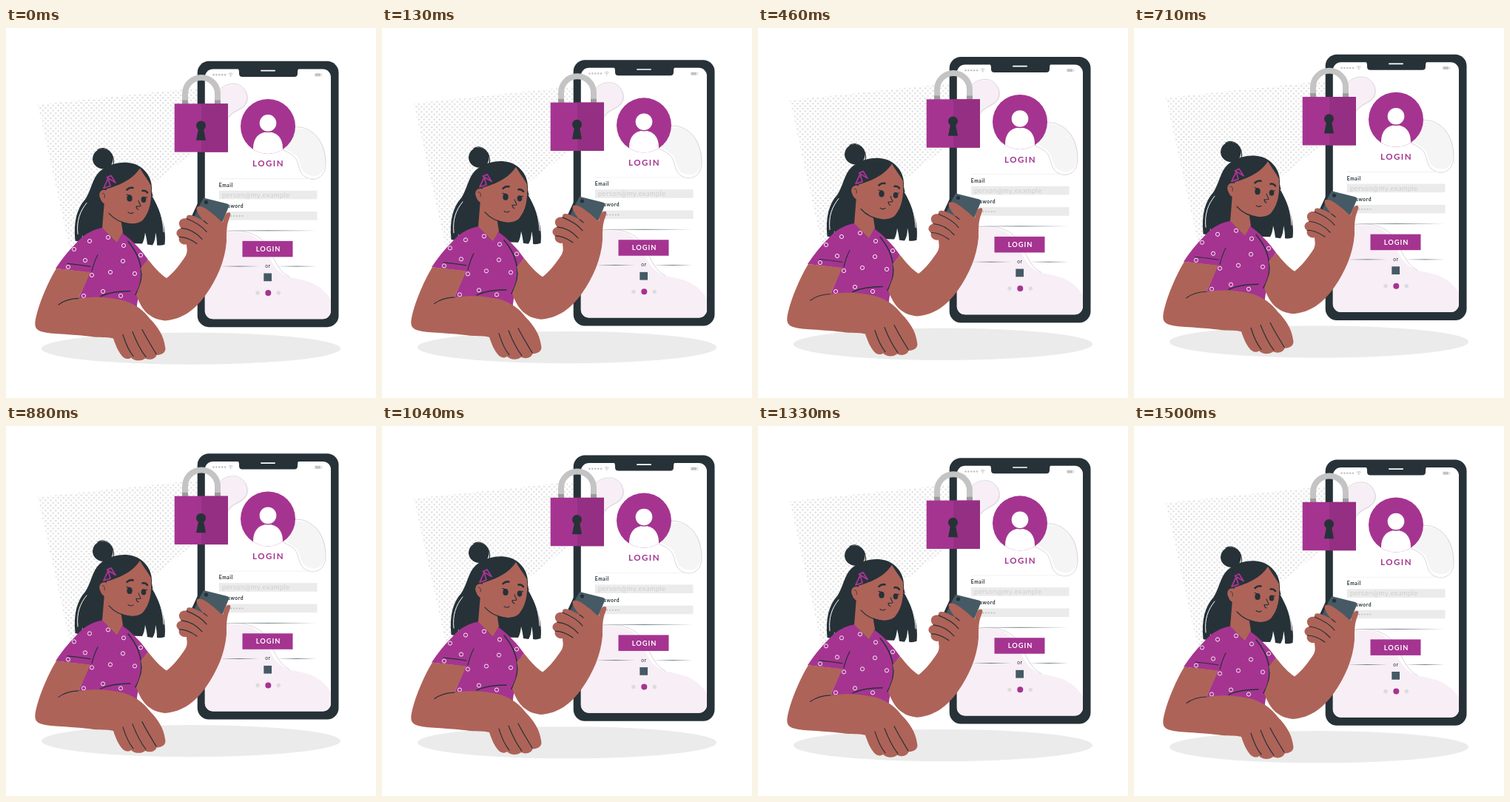
An HTML page for the animation above (1.54 s loop, 500 by 500 pixels).

```html
<!DOCTYPE html>
<html lang="en">
<head>
<meta charset="utf-8">
<title>Login illustration</title>
<style>
  html, body { margin: 0; width: 100%; height: 100%; overflow: hidden; background: #fff; }
  svg { display: block; width: 100vw; height: 100vh; }
  text { font-family: Lato, "Open Sans", sans-serif; }
  .dark { fill: #263238; }
  .main { fill: #a53491; }
  .skin { fill: #ae6358; }
  .pale { fill: #f7eef6; }
  .field { fill: #ebebeb; }
  .hint { fill: #b9b9b9; }
  .line { fill: none; stroke: #263238; stroke-width: 1.2; stroke-linecap: round; stroke-linejoin: round; }
  .edge { fill: none; stroke: #cfcbd0; stroke-width: .8; }
  .gap { fill: none; stroke: #fff; stroke-width: 1; stroke-linecap: round; }
  .label { font-size: 6.7px; font-weight: 700; letter-spacing: .58px; fill: #263238; }
</style>
</head>
<body>
<svg viewBox="0 0 500 500">
  <defs>
    <pattern id="dots" width="6.9" height="6.9" patternUnits="userSpaceOnUse">
      <circle cx="1.725" cy="1.725" r="1.35" fill="#dfdfdf"/>
      <circle cx="5.175" cy="5.175" r="1.35" fill="#dfdfdf"/>
    </pattern>
    <linearGradient id="fade">
      <stop offset="0" stop-color="#455a64" stop-opacity="0"/>
      <stop offset=".5" stop-color="#455a64"/>
      <stop offset="1" stop-color="#455a64" stop-opacity="0"/>
    </linearGradient>
    <clipPath id="screen"><rect x="268.8" y="56" width="170.2" height="337.7" rx="11"/></clipPath>
    <clipPath id="disc"><circle cx="354" cy="133.5" r="37"/></clipPath>
  </defs>

  <g id="scene">
    <path fill="url(#dots)" d="M43 104 L262 81 L264 160 L86 298 Z"/>
    <ellipse class="field" cx="250" cy="433.7" rx="202" ry="21.6"/>

    <g id="phone">
      <rect class="dark" x="258.7" y="45.4" width="190.8" height="359.3" rx="15.500"/>
      <g clip-path="url(#screen)">
        <rect x="268" y="55" width="172" height="340" fill="#fff"/>
        <path class="pale" d="M284 90 C291 81 298 77 307 77 C320 77 328 88 327 98 C325 113 308 111 302 122 C295 133 290 150 280 150 Z"/>
        <path class="edge" d="M284 89 C291 80 298 76 306 76 C320 75 327 88 326 97 C324 111 307 111 301 121"/>
        <path fill="#f5f5f5" d="M380 141 C400 129 430 141 432 178 C432 194 424 203 412 200 C394 196 401 181 391 172 C380 165 370 160 370 146 Z"/>
        <path class="edge" d="M388 135 C406 131 431 146 432 182 C433 199 421 208 409 204 C392 198 399 182 388 173 C383 169 378 167 374 165"/>
        <path class="pale" d="M268 282 C284 280 292 276 309 276 C330 276 342 284 349 297 C360 318 364 332 386 338 C408 342 426 346 440 369 L440 396 L268 396 Z"/>
        <path class="edge" d="M289 278 C310 271 334 275 347 288 C361 303 364 328 383 337"/>
      </g>
      <path class="dark" d="M312 54 H397 Q394 56 394 60 V62 Q394 66.500 389.500 66.500 H319.500 Q315 66.500 315 62 V60 Q315 56 312 54 Z"/>
      <rect x="344" y="57.300" width="20" height="1.700" rx=".8" fill="#fff"/>
      <g id="status" fill="#c3c3c3">
        <path fill="none" stroke="#c3c3c3" stroke-width="1" d="M300.800 62.500 Q303.700 60.200 306.600 62.500 M302 64 Q303.700 62.700 305.400 64"/>
        <circle cx="303.700" cy="65.400" r=".8"/>
        <rect x="417.500" y="61.800" width="7.500" height="4" rx=".6"/>
        <rect x="425.600" y="61.800" width="1.700" height="4" fill="#e0e0e0"/>
      </g>

      <circle class="main" cx="354" cy="133.500" r="37"/>
      <path clip-path="url(#disc)" fill="#fff" d="M334 172 V163 C334 149 342 141 354 141 S374 149 374 163 V172 Z"/>
      <circle cx="354" cy="129" r="12" fill="#fff" stroke="#a53491" stroke-width="1.300"/>
      <text class="main" x="333" y="188" font-size="11.500" font-weight="700" letter-spacing="1.500">LOGIN</text>
      <rect x="288" y="203.800" width="132" height=".8" fill="#eee"/>

      <text class="label" x="287.800" y="215.300">Email</text>
      <rect class="field" x="287.800" y="220.300" width="132.700" height="11.600"/>
      <text class="hint" x="292" y="229.300" font-size="9.500" font-weight="300" letter-spacing=".45">person@my.example</text>
      <text class="label" x="287.800" y="243.600">Password</text>
      <rect class="field" x="287.800" y="248.600" width="132.700" height="11.600"/>
      <rect x="288" y="274" width="132" height=".8" fill="url(#fade)"/>

      <rect class="main" x="319.500" y="288.400" width="68" height="21.500"/>
      <text x="337.800" y="302.600" font-size="9.300" font-weight="700" letter-spacing=".95" fill="#fff">LOGIN</text>
      <rect x="288" y="322.200" width="54" height=".8" fill="url(#fade)"/>
      <rect x="366" y="322.200" width="54" height=".8" fill="url(#fade)"/>
      <text x="353.800" y="324.600" font-size="6.800" letter-spacing=".4" text-anchor="middle" fill="#263238">or</text>
      <rect x="348.300" y="332" width="10.700" height="10.700" fill="#455a64"/>
      <circle cx="340" cy="358.500" r="2.700" fill="#dcdcdc"/>
      <circle class="main" cx="354.300" cy="358.500" r="4"/>
      <circle cx="368.300" cy="358.500" r="2.700" fill="#dcdcdc"/>
    </g>

    <g id="lock">
      <path fill="none" stroke="#c4c4c4" stroke-width="8" d="M242 104 V89.500 a22 22 0 0 1 44 0 V104"/>
      <path fill="none" stroke="#9c9c9c" stroke-width="8" d="M242 98 V104 M286 98 V104"/>
      <rect class="main" x="227.700" y="102.800" width="72.300" height="65.400"/>
      <rect x="264" y="102.800" width="36" height="65.400" fill="#952f83"/>
      <circle class="dark" cx="263.500" cy="132.500" r="6.500"/>
      <path class="dark" d="M260.500 134 H266.500 L270 152.300 H257 Z"/>
    </g>

    <g id="head">
      <path class="dark" d="M131 191 C122 190 117 184 117 177 C118 168 124 163.500 131.500 163.500 C140 165 145 171 144.500 178 C144 186 139 191 131 191 Z"/>
      <path class="line" d="M124 165 C135 158 148 171 145 186"/>
      <path class="dark" d="M93.500 288 C91 262 96 244 107 232 C115 221 116 204 127 194 C139 183.500 158 179.500 173 184 C188 189 197 203 197 216 C196 229 205 239 209 252 C214 268 216 280 214.500 293 Q209 295 204 294 Q204 284 202 277 Q202 288 198 294 L191 293 Q190 284 188 277 Q187 287 184 292 L150 291 L106 291 Q104 285 103 280 Q103 286 102 290 Z"/>
      <path class="gap" d="M97 279 C95 261 100 248 109 237 M198 228 C208 244 212 258 213 276"/>
      <path class="skin" d="M133 234 L130 271 L150 291 L158 277 L155 258 Z"/>
      <path class="skin" d="M137 220 C128 217 124 224 127.500 231 C130 238 135 240 139 237 Z"/>
      <path class="skin" d="M136 218 C149 214 169 208 181 190 C186 199 193 207 196 214 C197 233 195 248 185 260 C177 267 163 266 152 260 C142 254 137 246 136 237 Z"/>
      <path class="line" d="M139 251 C146 259 155 264 168 265.500" stroke-width="1"/>
      <path class="line" d="M130 224 C133 223 134 227 133 230" style="stroke-width:.8"/>
      <ellipse class="dark" cx="167" cy="230.500" rx="3.700" ry="4.500"/>
      <ellipse class="dark" cx="186" cy="232.500" rx="3.300" ry="4.100"/>
      <path class="line" d="M168 227 L163 225.500 M187 230 L190.500 229.500"/>
      <path class="line" style="stroke-width:2.600" d="M163.500 219 Q167 215.500 171.500 216.500 M184.500 220.500 Q188 219.500 191 223"/>
      <path class="line" style="stroke-width:1.100" d="M179 234 L182 241 Q180 242 176 241.500 Q176 245 179 246 M165 249.500 Q168 252.500 172 250"/>
      <path fill="none" stroke="#a53491" stroke-width="1.900" stroke-linejoin="round" d="M132 217 L138 204 L141 214 Z M136.500 202.500 L142 200 L148 209.500 Z"/>
    </g>

    <g id="body">
      <path class="main" d="M130 270.500 C112 274 102 283 95 291 C84 302 75 313 67 325.500 L113 331 L98 366 L110 382 L177 381 C176 366 184 356 184 343 L183 325 L192 313.500 C182 299 170 287 157 277.500 L150 291 Z"/>
      <g id="rings" fill="none" stroke="#fff" stroke-width=".9"></g>
      <path class="line" d="M124 307 C120 314 118 321 116 329 M83 319 C94 320 104 321 114 323"/>
      <path class="line" style="stroke-width:1.600" d="M165 289 C176 302 183 317 183 334 C183 346 179 354 175 361"/>
      <path class="line" style="stroke-width:1.500" d="M128 363 C141 357 154 356 168 356"/>
    </g>

    <path class="skin" d="M68 325.500 C56 345 43 376 39.500 397 C38 409 45 411 60 413 C88 415 106 416 119 418 C131 419 139 418 145 420 C148 429 152 439 158 445 C162 448 166 448.500 169 446 C174 451 183 451 188 447 C194 450 202 448 203.500 442.500 C212 442 217 438 215 431 C213 416 205 404 195 394 C185 381 175 374 160 369 C140 364 120 363 98 366 L114 330.500 Z"/>
    <path class="line" d="M71 374.500 C78 369 87 366.500 98 366 M158 415 C162 428 167 438 172 444 M171 411 C176 424 182 436 189 445 M184 408 C190 420 197 431 203 441"/>

    <g id="hand">
      <path d="M267 230 L299 238 Q302 239 301 242 L288 273 L249 262 Z" fill="#455a64"/>
      <path class="dark" d="M267 229.500 Q263 229 261 233 L248.500 260 L251 263 L264 234 Z"/>
      <circle class="dark" cx="270.500" cy="236" r="2.600"/>
      <path class="skin" d="M176 361 C180 350 184 342 184 333 L182 325 L192 313.500 C200 323 208 333 217 338.500 C227 331 236 319 243 308 C246 302 244 297 244 293 C237 294 232 289 234 283 C228 280 230 272 237 271 C230 264 236 256 244 258 C243 251 251 253 257 256 L267 261 C261 254 256 247 258 242.500 C264 239 273 247 281 253 C286 257 289 261 293 263 C294 257 296 251 300 250 C304 249 304 253 302 257 C298 267 298 275 298 289 C296 315 285 340 270 361 C255 382 238 394 215 396 C196 394 184 384 176 361 Z"/>
      <path class="line" d="M244 258 C254 262 264 267 271 276 M237 271 C248 272 258 278 265 286 M234 283 C244 283 251 287 258 292 M267 261 L272 265"/>
    </g>
  </g>
</svg>
<script>
  const NS = "http://www.w3.org/2000/svg";

  function addCircle(parent, cx, cy, r) {
    const c = document.createElementNS(NS, "circle");
    c.setAttribute("cx", cx);
    c.setAttribute("cy", cy);
    c.setAttribute("r", r);
    parent.append(c);
  }

  const rings = document.getElementById("rings");
  [[113, 288], [92, 299], [84, 323], [107, 314], [138, 283], [159, 294], [182, 307],
   [158, 315], [141, 330], [174, 332], [116, 334], [131, 356], [155, 362], [105, 362]]
    .forEach(([x, y]) => addCircle(rings, x, y + .5, 2.6));

  const status = document.getElementById("status");
  for (let i = 0; i < 5; i++) addCircle(status, 280.5 + i * 3.9, 63.7, 1.3);

  // Password bullets
  const bullets = document.createElementNS(NS, "g");
  bullets.setAttribute("class", "hint");
  for (let i = 0; i < 8; i++) addCircle(bullets, 293 + i * 3.8, 254.6, .95);
  document.getElementById("phone").append(bullets);

  // The whole scene floats up 10px and back, drawn at 24 steps a second
  const LOOP = 1540, FPS = 24, STEPS = 37, RISE = 10;
  const scene = document.getElementById("scene");

  function draw() {
    const t = performance.now() % LOOP;
    const step = Math.min(STEPS - 1, Math.floor((t + 5) * FPS / 1000));
    const phase = (step + 1) / STEPS;
    const y = -RISE * (1 - Math.abs(2 * phase - 1));
    scene.setAttribute("transform", `translate(0 ${y.toFixed(3)})`);
    requestAnimationFrame(draw);
  }
  draw();
</script>
</body>
</html>
```
